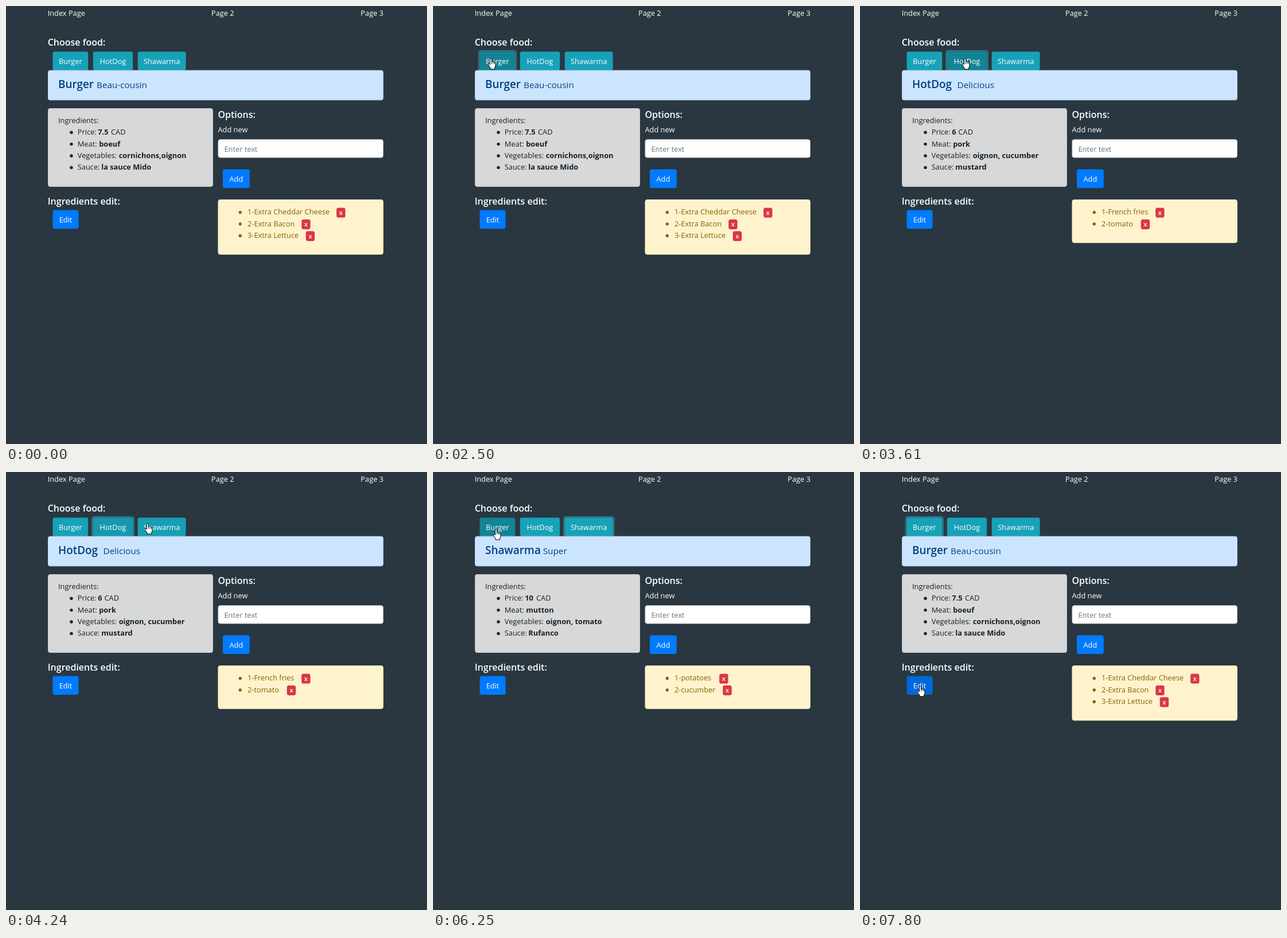
Animation, 734 px wide and 763 px high, one loop 8000 ms. Source, as an HTML page:

```html
<!DOCTYPE html>
<html lang="en">
<head>
<meta charset="utf-8">
<title>Food menu</title>
<style>
  html, body { margin: 0; width: 100%; height: 100%; overflow: hidden; background: #2a3740; }
  svg { display: block; width: 734px; height: 763px; }
  text { font: 12.8px "Open Sans", "Noto Sans", sans-serif; fill: #fff; white-space: pre; }
  .head { font-size: 16px; font-weight: 600; }
  .name { font-size: 18.9px; font-weight: 600; fill: #004085; }
  .sub { font-size: 15.3px; fill: #004085; }
  .info { fill: #1b1e21; }
  .bold { font-weight: 700; fill: #1b1e21; }
  .hint { fill: #6c757d; }
  .item { fill: #856404; }
  .mid { text-anchor: middle; }
  .end { text-anchor: end; }
  .x { font-size: 11px; font-weight: 600; text-anchor: middle; }
</style>
</head>
<body>
<svg id="stage" viewBox="0 0 734 763" xmlns="http://www.w3.org/2000/svg"></svg>
<script>
const LOOP = 8000, FADE = 150, SAMPLES = 10;
const LINE = 20.4;

const buttons = [
  { label: 'Burger', x: 81.5, y: 79.6, w: 61.7, rgb: [23, 162, 184], over: [19, 132, 150] },
  { label: 'HotDog', x: 151.8, y: 79.6, w: 69.4, rgb: [23, 162, 184], over: [19, 132, 150] },
  { label: 'Shawarma', x: 229.7, y: 79.6, w: 83.9, rgb: [23, 162, 184], over: [19, 132, 150] },
  { label: 'Add', x: 378, y: 284.6, w: 46.8, rgb: [0, 123, 255], over: [0, 105, 217] },
  { label: 'Edit', x: 81.5, y: 355.6, w: 45, rgb: [0, 123, 255], over: [0, 105, 217] }
];
const BTN_H = 32.3;

const foods = [
  { name: 'Burger', sub: 'Beau-cousin', subX: 158, price: '7.5', cadX: 183, meat: 'boeuf',
    veg: 'cornichons,oignon', sauce: 'la sauce Mido',
    extras: [['1-Extra Cheddar Cheese', 576.2], ['2-Extra Bacon', 515.3], ['3-Extra Lettuce', 522.8]] },
  { name: 'HotDog', sub: 'Delicious', subX: 169.5, price: '6', cadX: 171.5, meat: 'pork',
    veg: 'oignon, cucumber', sauce: 'mustard',
    extras: [['1-French fries', 515.2], ['2-tomato', 489.8]] },
  { name: 'Shawarma', sub: 'Super', subX: 191.7, price: '10', cadX: 180, meat: 'mutton',
    veg: 'oignon, tomato', sauce: 'Rufanco',
    extras: [['1-potatoes', 499.2], ['2-cucumber', 505.3]] }
];

// Pointer runs: start, end, number of steps, evenly timed way points
const runs = [
  [510, 585, 2, [[485, 647], [162, 464]]],
  [660, 660, 1, [[-50, -50]]],
  [1200, 1990, 11, [[44, 32], [76, 45], [107, 57], [109, 66], [104, 76], [100, 84]]],
  [2040, 2040, 1, [[101, 91]]],
  [2960, 3140, 3, [[128, 92], [183, 91]]],
  [4070, 4310, 4, [[198, 91], [271, 88]]],
  [5640, 5790, 3, [[250, 90], [84, 99]]],
  [5960, 6320, 6, [[77, 99], [86, 99], [95, 99], [103, 99], [110, 99], [109, 97]]],
  [7190, 7800, 9, [[112, 99], [150, 190], [138, 300], [112, 386], [105, 372]]]
];

// Time and index of the chosen button or shown food
const focusSteps = [[0, -1], [2350, 0], [3370, 1], [4480, 2], [6500, 0]];
const foodSteps = [[0, 0], [3530, 1], [4625, 2], [6645, 0]];

// Zones where the pointer turns into a text beam
const textZones = [[73, 53, 102, 21], [91, 126, 160, 22], [91, 192, 225, 96], [73, 330, 126, 20]];

const rect = (x, y, w, h, fill, extra = '') =>
  `<rect x="${x}" y="${y}" width="${w}" height="${h}" rx="3.4" fill="${fill}" ${extra}/>`;
const panel = (x, y, w, h, fill, line) =>
  rect(x + .5, y + .5, w - 1, h - 1, fill, `stroke="${line}"`);
const text = (x, y, str, cls = '') => `<text x="${x}" y="${y}" class="${cls}">${str}</text>`;
const dot = (x, y, fill) => `<circle cx="${x}" cy="${y}" r="2.7" fill="${fill}"/>`;

function buttonSvg(b, i) {
  const ring = rect(b.x - 1.35, b.y - 1.35, b.w + 2.7, BTN_H + 2.7, 'none',
    `id="ring${i}" stroke="rgb(58,176,195)" stroke-opacity=".5" stroke-width="2.7" opacity="0"`);
  return ring + rect(b.x, b.y, b.w, BTN_H, '#000', `id="btn${i}"`) +
    text(b.x + b.w / 2, b.y + 21.4, b.label, 'mid');
}

function foodSvg(f, i) {
  const rows = [['Price:', f.price, 160.3], ['Meat:', f.meat, 162.2],
    ['Vegetables:', f.veg, 196.7], ['Sauce:', f.sauce, 166.3]];
  let s = text(91, 143, f.name, 'name') + text(f.subX, 143, f.sub, 'sub');
  rows.forEach(([label, value, x], k) => {
    const y = 224.2 + k * LINE;
    s += dot(114, y - 4, '#1b1e21') + text(124.8, y, label, 'info') + text(x, y, value, 'bold');
  });
  s += text(f.cadX, 224.2, 'CAD', 'info');
  s += panel(369.5, 337, 288.5, 35 + f.extras.length * LINE, '#fff3cd', '#ffeeba');
  f.extras.forEach(([label, x], k) => {
    const y = 363.4 + k * LINE;
    s += dot(408.3, y - 4, '#856404') + text(421, y, label, 'item') +
      rect(x, y - 12, 15.4, 17.2, '#dc3545') + text(x + 7.7, y + .6, 'x', 'x');
  });
  return `<g id="food${i}">${s}</g>`;
}

const pointers = {
  arrow: '<path d="M.5.5V16L4.2 12.6 6.7 18.4 9 17.4 6.6 11.7H11.5Z" fill="#fff" stroke="#000"/>',
  beam: '<path d="M-2.5-6.5H-.5M1.5-6.5H3.5M.5-6V6M-2.5 6.5H-.5M1.5 6.5H3.5" fill="none" stroke="#d0d0d0"/>',
  hand: '<path d="M-1.5 1.6Q0-.4 1.5 1.6V6Q3.2 5 4.2 6.6 5.7 5.7 6.4 7.3 8 6.8 8 8.6V13Q8 15 6.5 17V19H-1V17L-4.4 11.7Q-5.4 9.6-4 9.3-2.6 9.3-1.5 11Z" fill="#fff" stroke="#000"/>' +
    '<path d="M1.5 6V10M4.2 6.8V10M6.4 7.5V10" stroke="#000" stroke-width=".8"/>'
};

const stage = document.getElementById('stage');
stage.innerHTML =
  text(72.7, 17, 'Index Page') + text(358, 17, 'Page 2') + text(658, 17, 'Page 3', 'end') +
  text(72.7, 69.3, 'Choose food:', 'head') + buttons.map(buttonSvg).join('') +
  panel(73, 111.7, 585, 52.6, '#cce5ff', '#b8daff') +
  panel(73, 178, 288, 137, '#d6d8d9', '#c6c8ca') + text(91, 204, 'Ingredients:', 'info') +
  text(369.5, 195, 'Options:', 'head') + text(369.5, 220.3, 'Add new') +
  panel(369.5, 232.2, 288.5, 32.3, '#fff', '#ced4da') + text(380.5, 254, 'Enter text', 'hint') +
  text(72.7, 345.7, 'Ingredients edit:', 'head') + foods.map(foodSvg).join('') +
  Object.entries(pointers).map(([k, s]) => `<g id="${k}">${s}</g>`).join('');

const el = id => document.getElementById(id);
const inside = ([px, py], x, y, w, h) => px >= x && px <= x + w && py >= y && py <= y + h;
const valueAt = (steps, t) => steps.reduce((v, s) => t >= s[0] ? s[1] : v, steps[0][1]);

function pointerAt(t) {
  const run = runs.filter(r => t >= r[0]).pop();
  if (!run) return [-50, -50];
  const [start, end, count, path] = run;
  if (count === 1) return path[0];
  const step = Math.min(count - 1, Math.floor((t - start) / (end - start) * (count - 1) + 1e-6));
  const p = step / (count - 1) * (path.length - 1);
  const i = Math.min(path.length - 2, Math.floor(p));
  return path[i].map((v, k) => Math.round(v + (path[i + 1][k] - v) * (p - i)));
}

const hoverAt = t => {
  const p = pointerAt(t);
  return buttons.findIndex(b => inside(p, b.x, b.y, b.w, BTN_H));
};

// Share of the last FADE ms during which a state picked button i
const recent = (state, t) => {
  const picks = Array.from({ length: SAMPLES }, (_, k) => state(t - k * FADE / SAMPLES));
  return i => picks.filter(p => p === i).length / SAMPLES;
};

function draw(t) {
  const hover = recent(hoverAt, t);
  const focus = recent(u => valueAt(focusSteps, u), t);
  buttons.forEach((b, i) => {
    const rgb = b.rgb.map((v, k) => Math.round(v + (b.over[k] - v) * hover(i)));
    el('btn' + i).setAttribute('fill', `rgb(${rgb})`);
    el('ring' + i).setAttribute('opacity', focus(i));
  });

  const food = valueAt(foodSteps, t);
  foods.forEach((f, i) => el('food' + i).setAttribute('display', i === food ? 'inline' : 'none'));

  const p = pointerAt(t);
  const kind = hoverAt(t) >= 0 ? 'hand' : textZones.some(z => inside(p, ...z)) ? 'beam' : 'arrow';
  for (const k in pointers) {
    el(k).setAttribute('display', k === kind ? 'inline' : 'none');
    el(k).setAttribute('transform', `translate(${p})`);
  }
}

const begin = performance.now();
function tick() {
  draw((performance.now() - begin) % LOOP);
  requestAnimationFrame(tick);
}
tick();
</script>
</body>
</html>
```
